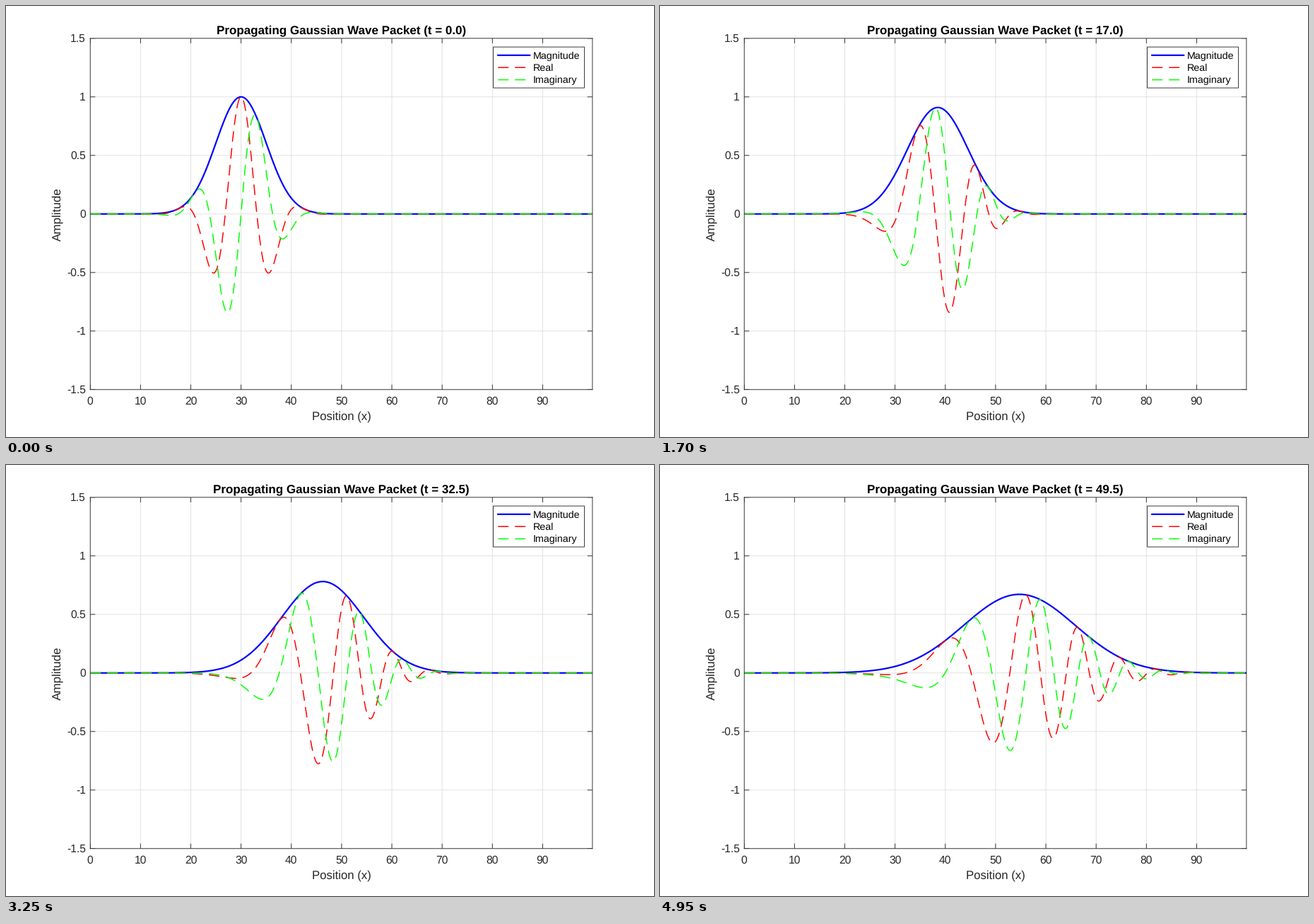
A matplotlib script that plays this animation: 917x611 px, repeating every 5000 ms.

```python
import numpy as np
import matplotlib.pyplot as plt
from matplotlib.animation import FuncAnimation
from matplotlib.patches import Rectangle

plt.rcParams.update({
    "font.family": "Liberation Sans",
    "text.hinting": "none",
    "path.snap": False,
})

W, H, DPI = 917, 611, 64
PX = 72 / DPI                      # points per pixel
BOX = (0.13, 0.11, 0.775, 0.815)   # plot area as fractions of the figure
LEFT, RIGHT = BOX[0] * W, (BOX[0] + BOX[2]) * W
TOP, BOTTOM = (1 - BOX[1] - BOX[3]) * H, (1 - BOX[1]) * H
MID_X, MID_Y = (LEFT + RIGHT) / 2, (TOP + BOTTOM) / 2
INK = "#262626"
THIN = 0.9 * PX
FRAMES, INTERVAL, DT = 100, 50, 0.5

# Free Gaussian packet with hbar = m = 1
LENGTH, N = 100, 1024
X0, SIGMA, K0 = 30, 5, 0.5
x = np.arange(N) * LENGTH / N

STYLES = [
    ("Magnitude", dict(color="#0000ff", lw=2.2 * PX)),
    ("Real", dict(color="#ff0000", lw=1.5 * PX, ls=(0, (10, 6)))),
    ("Imaginary", dict(color="#00ff00", lw=1.5 * PX, ls=(0, (10, 6)))),
]


def packet(t):
    spread = 1 + 1j * t / SIGMA**2
    u = x - X0
    envelope = np.exp(-(u - K0 * t) ** 2 / (2 * SIGMA**2 * spread))
    return envelope * np.exp(1j * (K0 * u - K0**2 * t / 2)) / np.sqrt(spread)


fig = plt.figure(figsize=(W / DPI, H / DPI), dpi=DPI, facecolor="white")

ax = fig.add_axes(BOX)
xticks, yticks = np.arange(0, 100, 10), np.arange(-1.5, 1.6, 0.5)
ax.set(xlim=(0, x[-1]), ylim=(-1.5, 1.5), xticks=xticks, yticks=yticks)
ax.set_axisbelow(True)
ax.grid(color="#dfdfdf", lw=THIN)
ax.tick_params(length=0, labelbottom=False, labelleft=False)
for spine in ax.spines.values():
    spine.set(color=INK, lw=THIN)

# Inward tick marks on all four sides
tick = 0.01 * (RIGHT - LEFT)
tx, ty = tick / (RIGHT - LEFT), tick / (BOTTOM - TOP)
mark = dict(color=INK, lw=THIN)
for start, end in ((0, ty), (1 - ty, 1)):
    ax.vlines(xticks, start, end, transform=ax.get_xaxis_transform(), **mark)
for start, end in ((0, tx), (1 - tx, 1)):
    ax.hlines(yticks, start, end, transform=ax.get_yaxis_transform(), **mark)
ax.set(xlim=(0, x[-1]), ylim=(-1.5, 1.5))

# Overlay in pixel units, origin at the top left
stage = fig.add_axes([0, 0, 1, 1])
stage.set(xlim=(0, W), ylim=(H, 0))
stage.axis("off")


def label(px, py, text, size, ha="center", color=INK, **kw):
    return stage.text(px, py, text, fontsize=size * PX, ha=ha, va="baseline",
                      color=color, **kw)


for v in xticks:
    label(LEFT + v / x[-1] * (RIGHT - LEFT), 565.2, f"{v:.0f}", 15.6)
for v in yticks:
    label(112.8, MID_Y - v / 3 * (BOTTOM - TOP) + 5.5, f"{v:g}", 15.6, ha="right")
label(MID_X + 0.4, 586, "Position (x)", 16.8)
label(77.4, MID_Y, "Amplitude", 17, rotation=90, rotation_mode="anchor")
title = label(MID_X, 39.3, "", 16.95, color="black", weight="bold")

stage.add_patch(Rectangle((689.5, 58.1), 129, 58, fc="white", ec=INK, lw=THIN))
for i, (name, style) in enumerate(STYLES):
    y = 69.8 + 17.4 * i
    stage.plot([696.2, 741.2], [y, y], **style)
    label(745.7, y + 4.8, name, 14.2, ha="left", color="black")

curves = [ax.plot(x, 0 * x, **style)[0] for _, style in STYLES]


def draw(frame):
    t = frame * DT
    psi = packet(t)
    for curve, values in zip(curves, (abs(psi), psi.real, psi.imag)):
        curve.set_ydata(values)
    title.set_text(f"Propagating Gaussian Wave Packet (t = {t:.1f})")
    return [*curves, title]


anim = FuncAnimation(fig, draw, frames=FRAMES, interval=INTERVAL, repeat=True,
                     repeat_delay=0, blit=False)
plt.show()
```
